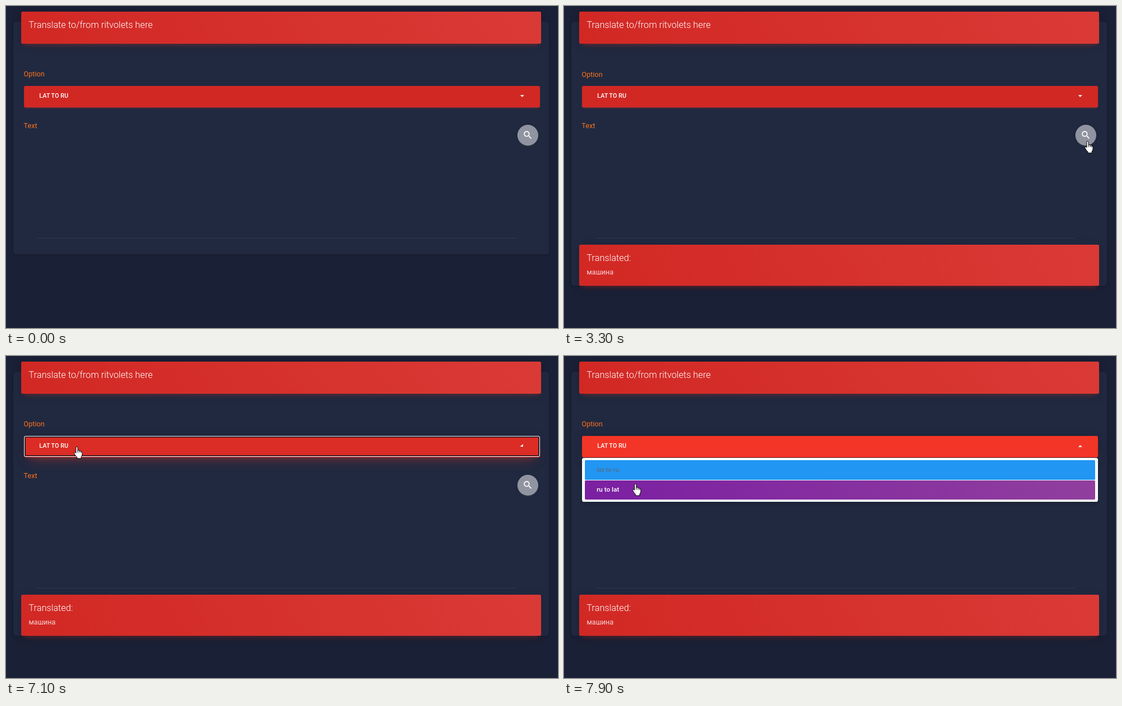
These frames come from a looping animation (979 by 572 pixels, 8 s). An HTML page:

```html
<!DOCTYPE html>
<html lang="en">
<head>
<meta charset="utf-8">
<title>Transliteration form</title>
<style>
html, body { margin: 0; width: 100%; height: 100%; overflow: hidden; background: #1a2035; }
#stage { position: absolute; left: 0; top: 0; width: 979px; height: 572px; overflow: hidden; font-family: Roboto, Arial, sans-serif; }
#stage div, #stage svg, #stage span { position: absolute; box-sizing: border-box; }
#stage span { line-height: 0; white-space: pre; }
.card { background: #202940; border-radius: 5.4px; box-shadow: 0 1px 4px rgba(0,0,0,.14); }
.banner { background: linear-gradient(60deg, #d22824, #da3a36); border-radius: 2.7px;
  box-shadow: 0 3.6px 18px rgba(0,0,0,.14), 0 6.3px 9px -4.5px rgba(244,67,54,.4); }
.button { border-radius: 2.7px; }
.ring { border: 1.2px solid #fff; border-radius: 3px; box-shadow: inset 0 0 0 1.6px #10131f; }
.round { border-radius: 50%; background: #9094a0; box-shadow: 0 2px 2px rgba(153,153,153,.14), 0 1px 4.5px rgba(0,0,0,.25); }
.menu { background: #fff; border-radius: 3.6px; transform-origin: 0 0; box-shadow: 0 2px 5px rgba(0,0,0,.26); }
.item { border-radius: 1.8px; }
.violet { background: linear-gradient(60deg, #7b1fa2, #913f9e); }
</style>
</head>
<body>
<div id="stage"></div>
<script>
const LOOP = 8000, STEP = 100;
const stage = document.getElementById('stage');

function box(cls, x, y, w, h, parent = stage) {
  const el = document.createElement('div');
  el.className = cls;
  el.style.cssText = `left:${x}px;top:${y}px;width:${w}px;height:${h}px`;
  parent.append(el);
  return el;
}

// Places text by its left edge and baseline.
function label(str, x, base, size, color, weight = 400, parent = stage) {
  const el = document.createElement('span');
  el.textContent = str;
  el.style.cssText = `left:${x}px;top:${base - size * 0.342}px;font-size:${size}px;color:${color};font-weight:${weight}`;
  parent.append(el);
  return el;
}

function drawing(markup) {
  stage.insertAdjacentHTML('beforeend',
    `<svg width="979" height="572" style="left:0;top:0;pointer-events:none">${markup}</svg>`);
  return stage.lastElementChild;
}

const ORANGE = '#ff7119', GREY = '#606477';
const card = box('card', 13, 28, 950, 413);

box('banner', 27, 10, 922, 56.5);
label('Translate to/from ritvolets here', 40.3, 39.5, 16.2, '#fff', 300);

const option = label('Option', 31.3, 125, 12.6, ORANGE);
const button = box('button', 32, 142, 915, 37.5);
label('LAT TO RU', 27, 22, 10.8, '#fff', 500, button);
const ring = box('ring', 0.4, 0.4, 914.2, 36.7, button);

label('Text', 31.3, 217.5, 12.6, ORANGE);
const typed = label('машина', 54.7, 240, 12.6, '#fff', 500);
const caret = box('', 55, 229, 1, 16);
caret.style.background = '#fff';
box('', 55, 412, 851, 1).style.background = 'rgba(180,180,180,.1)';
const underline = box('', 55, 412, 851, 2);
underline.style.background = '#9c27b0';

box('round', 907, 211, 37, 37);
const icons = drawing(`
  <path fill="#fff" transform="translate(916 219.7) scale(.79)" d="M15.5 14h-.79l-.28-.27C15.41 12.59 16 11.11 16 9.5 16 5.91 13.09 3 9.5 3S3 5.91 3 9.5 5.91 16 9.5 16c1.61 0 3.09-.59 4.23-1.57l.27.28v.79l5 4.99L20.49 19l-4.99-5zm-6 0C7.01 14 5 11.99 5 9.5S7.01 5 9.5 5 14 7.01 14 9.5 11.99 14 9.5 14z"/>
  <path id="chevron" fill="#fff" d="M-3.5-1.7h7L0 1.8z"/>`);
const chevron = icons.querySelector('#chevron');

const result = box('banner', 27, 424, 922, 73);
label('Translated:', 13.3, 29.5, 16.2, '#fff', 300, result);
label('машина', 13.2, 53, 12.6, 'rgba(255,255,255,.8)', 400, result);

const menu = box('menu', 32, 181, 915, 78);
box('item', 5, 4, 905, 35, menu).style.background = '#2196f3';
const violet = box('item violet', 5, 39.5, 905, 34, menu);
label('lat to ru', 26, 25, 11.7, GREY, 400, menu);
const second = label('ru to lat', 26, 60, 11.7, GREY, 400, menu);

const pointer = drawing(`
  <g id="arrow"><path fill="#fff" stroke="#000" d="M.5.5V16.5L4.2 13l2.6 5.6 2.4-1.1L6.7 12H11.8z"/></g>
  <g id="beam"><path fill="none" stroke="#fff" d="M-3.5-6.5h2.6Q0-6.5 0-5.5 0-6.5.9-6.5H3.5M0-6V6M-3.5 6.5h2.6Q0 6.5 0 5.5 0 6.5.9 6.5H3.5"/></g>
  <g id="hand"><path fill="#fff" stroke="#000" d="M-2 1.8a1.6 1.6 0 0 1 3.2 0V6.5q2.6-1 3 .9 2.2-.6 2.7 1 2.2 0 2.2 2.2V14q0 2.5-1.8 4v3H0v-2.2q-3-2.5-5-6.6-.9-2.2 1-2.4 1 0 2 1.6z"/>
    <path stroke="#000" d="M1.2 6.5V10.5M4.2 7.4V10.5M6.9 8.4V11"/></g>`);
const shapes = ['arrow', 'beam', 'hand'].map(id => pointer.querySelector('#' + id));

// Time, x, y of the pointer's hot spot.
const path = [
  [300, 10, -18], [1100, 600, 240], [2200, 600, 240], [2600, 833, 252], [2900, 929, 240],
  [3400, 929, 240], [4100, 675, 319], [4300, 596, 344], [4400, 596, 344], [5300, 57, -20],
  [6200, 50, -20], [7000, 125, 160], [7100, 126, 161], [7300, 126, 161], [7400, 126, 166], [7900, 127, 227]
];

const clamp = v => Math.max(0, Math.min(1, v));
const mix = (a, b, p) => a + (b - a) * p;
const show = (el, on) => { el.style.visibility = on ? 'visible' : 'hidden'; };
const within = (t, a, b) => t >= a && t < b;

function pointerAt(t) {
  let i = 0;
  while (i < path.length - 2 && t > path[i + 1][0]) i++;
  const [t0, x0, y0] = path[i], [t1, x1, y1] = path[i + 1];
  const p = clamp((t - t0) / (t1 - t0)), e = p * p * (3 - 2 * p);
  return [mix(x0, x1, e), mix(y0, y1, e)];
}

function shapeAt(x, y, t) {
  const onButton = within(x, 32, 947) && within(y, 142, t >= 7200 ? 259 : 179.5);
  if (onButton || Math.hypot(x - 925.5, y - 229.5) < 18.5) return 2;
  return within(x, 55, 906) && within(y, 225, 412) ? 1 : 0;
}

function drawPointer(t) {
  const [x, y] = pointerAt(t), kind = shapeAt(x, y, t);
  shapes.forEach((g, i) => {
    g.style.display = i === kind ? '' : 'none';
    g.setAttribute('transform', `translate(${Math.round(x)} ${Math.round(y)})`);
  });
}

function drawField(t) {
  show(typed, within(t, 2000, 3100));
  show(caret, within(t, 1100, 1600) || within(t, 2000, 2500));
  caret.style.left = (t < 2000 ? 55 : 103) + 'px';
  const grow = t < 1200 ? 0.7 : t < 1400 ? 0.976 : 1;
  underline.style.transform = `scaleX(${grow})`;
  show(underline, within(t, 1100, 3100));
}

function drawButton(t) {
  const held = within(t, 7300, 7400) ? 7200 : t;
  const p = clamp((held - 7000) / 350);
  const rgb = [[210, 243], [40, 53], [36, 39]].map(([a, b]) => mix(a, b, p));
  button.style.background = `rgb(${rgb})`;
  button.style.boxShadow = t >= 7000
    ? '0 12.6px 23.4px -10.8px rgba(244,67,54,.42), 0 3.6px 20.7px rgba(0,0,0,.12), 0 7.2px 9px -4.5px rgba(244,67,54,.2)'
    : '0 1.8px 1.8px rgba(244,67,54,.14), 0 2.7px .9px -1.8px rgba(244,67,54,.2), 0 .9px 4.5px rgba(244,67,54,.12)';
  show(ring, within(t, 7100, 7600));
  const turn = t < 7100 ? 0 : t < 7200 ? -35 : -180;
  chevron.setAttribute('transform', `translate(915.5 160) rotate(${turn})`);
}

function drawMenu(t) {
  const scale = t < 7400 ? 0.69 : t < 7500 ? 0.972 : 1;
  show(menu, t >= 7200);
  menu.style.transform = `scale(${scale})`;
  menu.style.opacity = scale;
  const hover = t >= 7800;
  violet.style.opacity = hover ? 1 : 0;
  second.style.color = hover ? '#fff' : GREY;
  second.style.fontWeight = hover ? 500 : 400;
}

function render(now) {
  const t = Math.floor((now % LOOP) / STEP) * STEP;
  const done = t >= 3300;
  card.style.height = (done ? 469 : 413) + 'px';
  show(result, done);
  option.style.transform = `translateY(${within(t, 3300, 3500) ? 1 : 0}px)`;
  drawField(t);
  drawButton(t);
  drawMenu(t);
  drawPointer(t);
}

const start = performance.now();
function tick() {
  render(performance.now() - start);
  requestAnimationFrame(tick);
}
tick();
</script>
</body>
</html>
```
